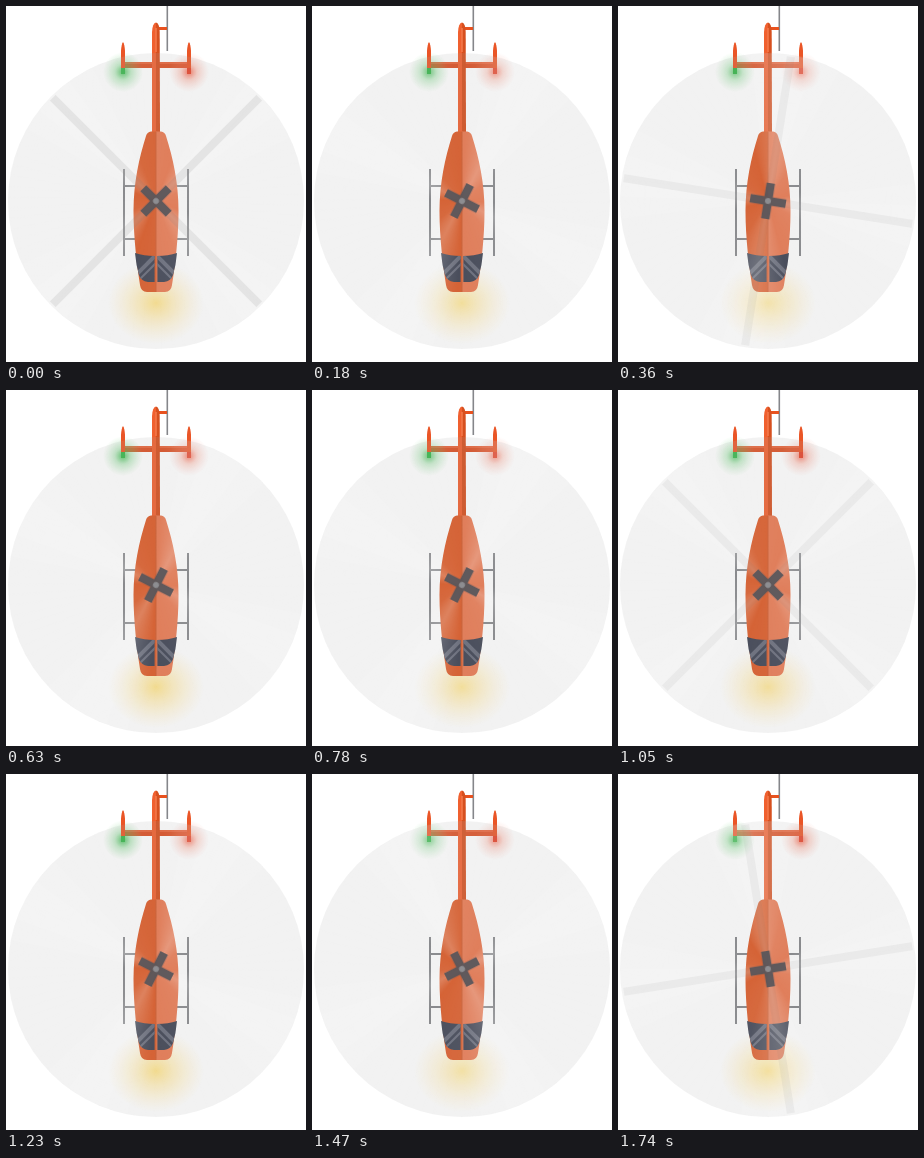
An HTML page for the animation above (1770 ms loop, 300 px wide and 356 px high).

```html
<!DOCTYPE html>
<html lang="en">
<head>
<meta charset="utf-8">
<title>Helicopter</title>
<style>
  html, body { margin: 0; width: 100%; height: 100%; overflow: hidden; background: #fff; }
  .stage { position: relative; width: 300px; height: 356px; overflow: hidden; }
  svg { position: absolute; left: 0; top: 0; display: block; }

  .disc, .spin {
    position: absolute; left: 2px; top: 47px;
    width: 296px; height: 296px; border-radius: 50%;
  }
  .disc { background: rgba(160, 160, 160, .14); }
  .spin { animation: turn 1770ms steps(59) infinite; }
  .sheen {
    position: absolute; inset: 0; border-radius: 50%;
    background: repeating-conic-gradient(from 90deg,
      rgba(255,255,255,.2) 0deg, rgba(255,255,255,.04) 24deg,
      rgba(255,255,255,0) 66deg, rgba(255,255,255,.2) 90deg);
  }
  .blades { animation: show 1770ms step-end infinite; }
  .glow { animation: pulse 600ms ease-in-out infinite; }

  /* 18 degrees counter-clockwise every 30 ms */
  @keyframes turn {
    from { transform: rotate(45deg); }
    to { transform: rotate(-1017deg); }
  }
  @keyframes show {
    0% { opacity: 1; }
    1.69% { opacity: 0; }
    19.2% { opacity: .55; }
    33.9% { opacity: 0; }
    53.1% { opacity: .55; }
    67.8% { opacity: 0; }
    87% { opacity: .55; }
  }
  @keyframes pulse {
    0%, 100% { opacity: 1; }
    50% { opacity: .8; }
  }
</style>
</head>
<body>
<div class="stage">
  <svg width="300" height="356" viewBox="0 0 300 356">
    <defs>
      <radialGradient id="lamp">
        <stop offset="0" stop-color="#ffd95a" stop-opacity=".7"/>
        <stop offset=".45" stop-color="#ffe082" stop-opacity=".4"/>
        <stop offset="1" stop-color="#ffe9a8" stop-opacity="0"/>
      </radialGradient>
      <radialGradient id="green">
        <stop offset="0" stop-color="#2fb544" stop-opacity=".85"/>
        <stop offset=".4" stop-color="#4cc35c" stop-opacity=".35"/>
        <stop offset="1" stop-color="#7fd488" stop-opacity="0"/>
      </radialGradient>
      <radialGradient id="red">
        <stop offset="0" stop-color="#f4482c" stop-opacity=".75"/>
        <stop offset=".4" stop-color="#f4694c" stop-opacity=".3"/>
        <stop offset="1" stop-color="#f79a86" stop-opacity="0"/>
      </radialGradient>
      <path id="half" d="M150 125.5H145Q141 126 140 130C133 152 127.5 177 127.5 205C127.5 232 131 260 134 279Q135 286 141 286H150Z"/>
      <path id="pane" d="M129 247Q138 250 148.6 250V276H142Q135 275 133 269Q130 259 129 247Z"/>
      <path id="fin" d="M115 68V45Q115.5 38 117 36Q118.600 38 119 45V68Z"/>
      <clipPath id="glass"><use href="#pane"/></clipPath>
      <g id="window">
        <use href="#pane" fill="#3b4050"/>
        <g clip-path="url(#glass)" stroke="#747987" stroke-opacity=".75">
          <path d="M128 271L150 249" stroke-width="4"/>
          <path d="M132 275L152 255" stroke-width="2"/>
        </g>
      </g>
    </defs>

    <ellipse class="glow" cx="150" cy="297" rx="48" ry="41" fill="url(#lamp)"/>

    <g fill="none" stroke="#85868a" stroke-width="2">
      <path d="M118 163V250M182 163V250M118 180H182M118 233H182"/>
      <path d="M161.300 0V45" stroke-width="1.600"/>
    </g>

    <path d="M152 22.500H161" stroke="#e8521f" stroke-width="3"/>
    <path d="M118 59H183" stroke="#dc5023" stroke-width="6"/>
    <path d="M118 57H183" stroke="#ec6a40" stroke-width="1.500"/>
    <path d="M146 127V26Q146.500 17 150 16.500V127Z" fill="#f0602f"/>
    <path d="M150 16.500Q153.500 17 153.700 26L154 127H150Z" fill="#d6501f"/>
    <path d="M150 22V46" stroke="#f57a4d" stroke-width="1.500"/>
    <g class="glow">
      <circle cx="117" cy="66" r="20" fill="url(#green)"/>
      <circle cx="183" cy="66" r="20" fill="url(#red)"/>
    </g>
    <use href="#fin" fill="#ea5526"/>
    <use href="#fin" x="66" fill="#ea5526"/>
    <path d="M115 62H119V68H115Z" fill="#35b549"/>
    <path d="M181 62H185V68H181Z" fill="#e5432a"/>

    <use href="#half" fill="#dd5824"/>
    <use href="#half" fill="#ea784f" transform="matrix(-1 0 0 1 300 0)"/>
    <path d="M150 126V286" stroke="#cf5a2d" stroke-width="1"/>
    <use href="#window"/>
    <use href="#window" transform="matrix(-1 0 0 1 300 0)"/>
  </svg>

  <div class="disc"></div>
  <div class="spin">
    <div class="sheen"></div>
    <svg width="296" height="296" viewBox="-148 -148 296 296">
      <g class="blades" stroke="#777" stroke-opacity=".12" stroke-width="8">
        <path d="M-146 0H-18M18 0H146M0 -146V-18M0 18V146"/>
      </g>
      <path d="M-18 0H18M0 -18V18" stroke="#55555b" stroke-opacity=".92" stroke-width="8.500"/>
      <circle r="3" fill="#8d8d91"/>
    </svg>
  </div>
</div>
</body>
</html>
```
